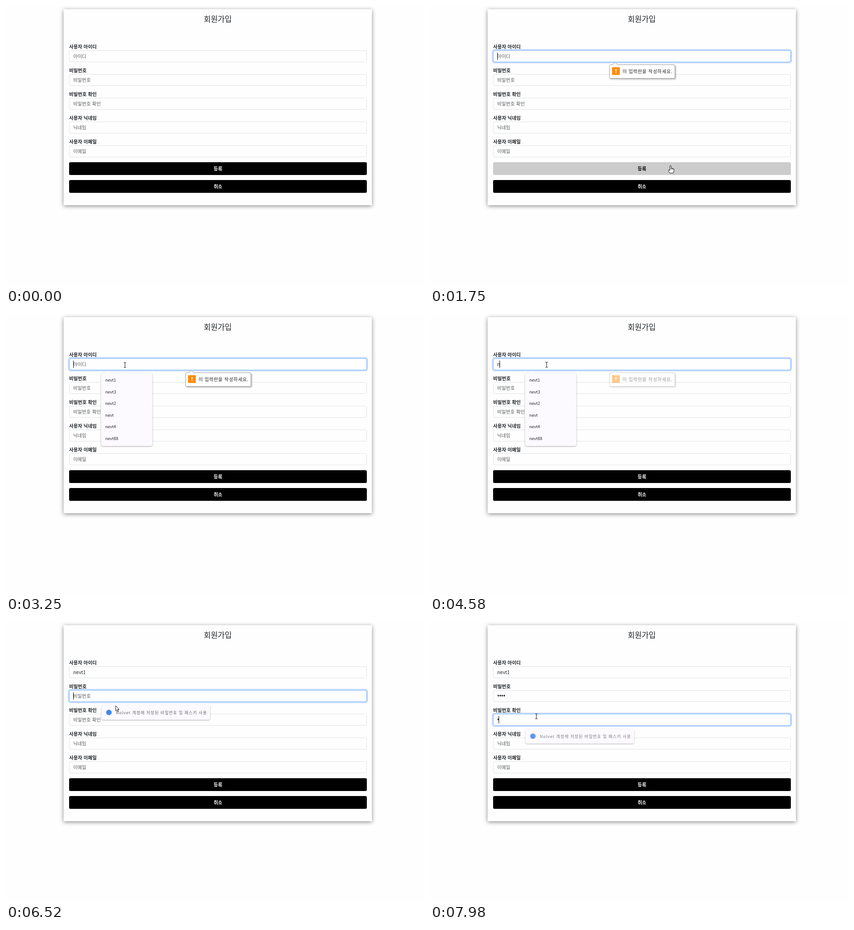
Write an HTML page that moves like this. It is 914 px wide and 613 px high and loops after 8 s.

```html
<!DOCTYPE html>
<html lang="ko">
<head>
<meta charset="utf-8">
<title>회원가입</title>
<style>
  html, body { margin: 0; width: 100%; height: 100%; overflow: hidden; background: #fefefe; }
  body { position: relative; font: 10.4px/20px "Noto Sans CJK KR", "Noto Sans CJK", "Noto Sans", sans-serif; color: #212529; }
  div, svg { position: absolute; box-sizing: border-box; white-space: nowrap; }
  .card { left: 126px; top: 7px; width: 674px; height: 428.5px; background: #fefefe; box-shadow: 0 2px 9px rgba(0,0,0,.45); }
  .title { left: 126px; top: 18px; width: 674px; text-align: center; font-size: 16.6px; font-weight: 300; }
  .label { left: 138px; font-weight: 700; }
  .field { left: 138px; width: 651px; height: 25.5px; padding-left: 8px; line-height: 23.5px;
           background: #fefefe; border: 1px solid #dee2e6; border-radius: 4px; }
  .field.focus { border-color: #86b7fe; box-shadow: 0 0 0 2.6px rgba(13,110,253,.25); }
  .text.empty { color: #595c5f; font-weight: 300; }
  .text.dots { font: 12.5px/20px "Liberation Sans", sans-serif; }
  .caret { top: 4px; width: 1px; height: 16px; background: #000; }
  .button { left: 138px; width: 651px; height: 27.5px; line-height: 27px; text-align: center;
            font-weight: 700; color: #fff; background: #000; border-radius: 3px; }
  .tip { left: 392px; top: 128px; width: 144px; height: 31px; background: #fff; border: 1px solid #999;
         border-radius: 3px; box-shadow: 2px 2px 3px rgba(0,0,0,.25); }
  .tip svg { left: 5px; top: -7px; }
  .mark { left: 5px; top: 5px; width: 17px; height: 17px; background: #ff8c0a; border-radius: 1px;
          color: #fff; font: 700 13px/17px "Noto Sans", sans-serif; text-align: center; }
  .tip p { position: absolute; left: 28px; top: 4px; margin: 0; font-size: 10px; letter-spacing: .7px; color: #222; }
  .menu { background: #fdfaff; border-radius: 4px; box-shadow: 0 1px 3px rgba(0,0,0,.35); }
  .menu::before { content: ""; position: absolute; left: 9px; top: -5px; border: 6px solid transparent;
                  border-top: 0; border-bottom: 5px solid #fdfaff; }
  .list { left: 208px; top: 128.5px; width: 111.5px; height: 160.5px; font-size: 9px; }
  .list div { left: 9px; }
  .saved { left: 209px; width: 237px; height: 32px; font-size: 9.2px; letter-spacing: .75px; color: #6a6a70; }
  .saved i { position: absolute; left: 10px; top: 10px; width: 12px; height: 12px; border-radius: 50%; background: #4285f4; }
  .saved div { left: 31px; top: 6px; }
  .cursor { left: 0; top: 0; overflow: visible; }
</style>
</head>
<body>
<div class="card"></div>
<div class="title">회원가입</div>
<div id="form"></div>
<div class="button" id="submit" style="top:342px">등록</div>
<div class="button" style="top:381px">취소</div>

<div class="tip" id="tip">
  <svg width="14" height="8"><path d="M1 7.5L7 1.5L13 7.5" fill="#fff" stroke="#999"/><path d="M1 7.5H13" stroke="#fff"/></svg>
  <div class="mark">!</div>
  <p>이 입력란을 작성하세요.</p>
</div>
<div class="menu list" id="list"></div>
<div class="menu saved" id="saved"><i></i><div>Nolvet 계정에 저장된 비밀번호 및 패스키 사용</div></div>

<svg class="cursor" width="20" height="20" fill="#fff" stroke="#111" stroke-linejoin="round">
  <path id="arrow" d="M.5 .5V11.6L3 9.3L4.8 13.3L6.6 12.5L4.9 8.6H8.3Z"/>
  <path id="hand" d="M-1.4 9V.8Q-1.2-.7 0-.7T1.3.8V5Q3.4 4.3 3.8 5.5Q5.3 5 5.8 6.2Q7.4 6 7.4 7.6V11L6.1 15.8H-1.6L-5 10.6Q-5.4 9-4 8.6Q-2.6 8.6-1.4 10.6ZM1.3 5V8M3.8 5.6V8M5.8 6.3V8.4"/>
  <path id="beam" fill="none" d="M-2.5-5.5H-1Q0-5.5 0-4.7Q0-5.5 1-5.5H2.5M0-4.7V4.7M-2.5 5.5H-1Q0 5.5 0 4.7Q0 5.5 1 5.5H2.5"/>
</svg>

<script>
const LOOP = 8000, BLINK = 530;
const $ = id => document.getElementById(id);
const clamp = v => Math.max(0, Math.min(1, v));

function add(parent, cls, text = '', top) {
  const el = document.createElement('div');
  el.className = cls;
  el.textContent = text;
  if (top !== undefined) el.style.top = top + 'px';
  parent.append(el);
  return el;
}

const fields = [
  ['사용자 아이디', '아이디'], ['비밀번호', '비밀번호'], ['비밀번호 확인', '비밀번호 확인'],
  ['사용자 닉네임', '닉네임'], ['사용자 이메일', '이메일']
].map(([label, hint], i) => {
  const y = 97 + 52.1 * i;
  add($('form'), 'label', label, y - 18.5);
  const box = add($('form'), 'field', '', y);
  const text = document.createElement('span');
  box.append(text);
  return { box, text, hint, caret: add(box, 'caret') };
});

['1', '3', '2', '', '4', '88'].forEach((n, i) => add($('list'), '', 'nevt' + n, 6.5 + 25.6 * i));

// Times at which each character is typed
const typed = [
  { value: 'nevt1', at: [4580, 4780, 4970, 5040, 5640] },
  { value: '••••', at: [6850, 6980, 7110, 7250] },
  { value: '•', at: [7980] }
];
const focusAt = [1730, 6250, 7650];

// Pointer path: time, x, y, shape
const path = [
  [190, 893, 597, 'arrow'], [400, 850, 470, 'arrow'], [650, 740, 290, 'arrow'],
  [800, 650, 218, 'arrow'], [940, 575, 293, 'arrow'], [1010, 563, 322, 'arrow'],
  [1130, 542, 342, 'hand'], [1280, 526, 350, 'hand'], [1900, 526, 350, 'hand'],
  [1970, 515, 340, 'arrow'], [2220, 441, 272, 'arrow'], [2290, 424, 172, 'arrow'],
  [2360, 396, 138, 'arrow'], [2450, 355, 116, 'beam'], [2820, 262, 112, 'beam'],
  [3180, 262, 112, 'beam'], [3450, 255, 111, 'beam'], [6000, 255, 111, 'beam'],
  [6200, 244, 158, 'beam'], [6380, 243, 163, 'beam'], [6470, 240, 178, 'arrow'],
  [6580, 238.5, 188.5, 'arrow'], [7380, 238.5, 188.5, 'arrow'], [7480, 235, 203, 'beam'],
  [7580, 232.5, 206.5, 'beam'], [LOOP, 232.5, 206.5, 'beam']
];

function drawCursor(t) {
  const i = path.findIndex(k => k[0] > t) - 1;
  for (const id of ['arrow', 'hand', 'beam']) $(id).style.display = i >= 0 && path[i][3] === id ? '' : 'none';
  if (i < 0) return;
  const [t0, x0, y0] = path[i], [t1, x1, y1] = path[i + 1];
  const k = (t - t0) / (t1 - t0);
  $('arrow').parentNode.style.transform = `translate(${x0 + (x1 - x0) * k}px, ${y0 + (y1 - y0) * k}px)`;
}

function drawFields(t) {
  const active = focusAt.filter(f => f <= t).length - 1;
  fields.forEach((f, i) => {
    const keys = typed[i] ? typed[i].at.filter(a => a <= t) : [];
    const value = keys.length ? typed[i].value.slice(0, keys.length) : '';
    f.text.textContent = value || f.hint;
    f.text.className = 'text' + (value ? i ? ' dots' : '' : ' empty');
    f.box.classList.toggle('focus', i === active);
    const since = t - (keys.length ? keys[keys.length - 1] : focusAt[i]);
    f.caret.style.display = i === active && Math.floor(since / BLINK) % 2 === 0 ? '' : 'none';
    f.caret.style.left = (value ? f.text.offsetLeft + f.text.getBoundingClientRect().width - 1 : 7.5) + 'px';
  });
}

// Visible from start, drops to level at end, then fades out
function show(id, t, start, end, level) {
  const o = t < start ? 0 : t < end ? 1 : level * clamp(1 - (t - end) / 200);
  $(id).style.opacity = o;
}

function drawPopups(t) {
  show('tip', t, 1750, 4580, .45);
  show('list', t, 3030, 5640, .8);
  const second = t >= 7650;
  $('saved').style.top = (second ? 233.5 : 181.5) + 'px';
  if (second) show('saved', t, 7720, 7980, .85);
  else show('saved', t, 6310, 6850, .85);
}

function drawButton(t) {
  const h = clamp((t - 1130) / 130) * (1 - clamp((t - 1970) / 130));
  const bg = 204 * h, fg = 255 * (1 - h);
  $('submit').style.background = `rgb(${bg},${bg},${bg})`;
  $('submit').style.color = `rgb(${fg},${fg},${fg})`;
}

function frame() {
  const t = performance.now() % LOOP;
  drawFields(t);
  drawPopups(t);
  drawButton(t);
  drawCursor(t);
  requestAnimationFrame(frame);
}
frame();
</script>
</body>
</html>
```
